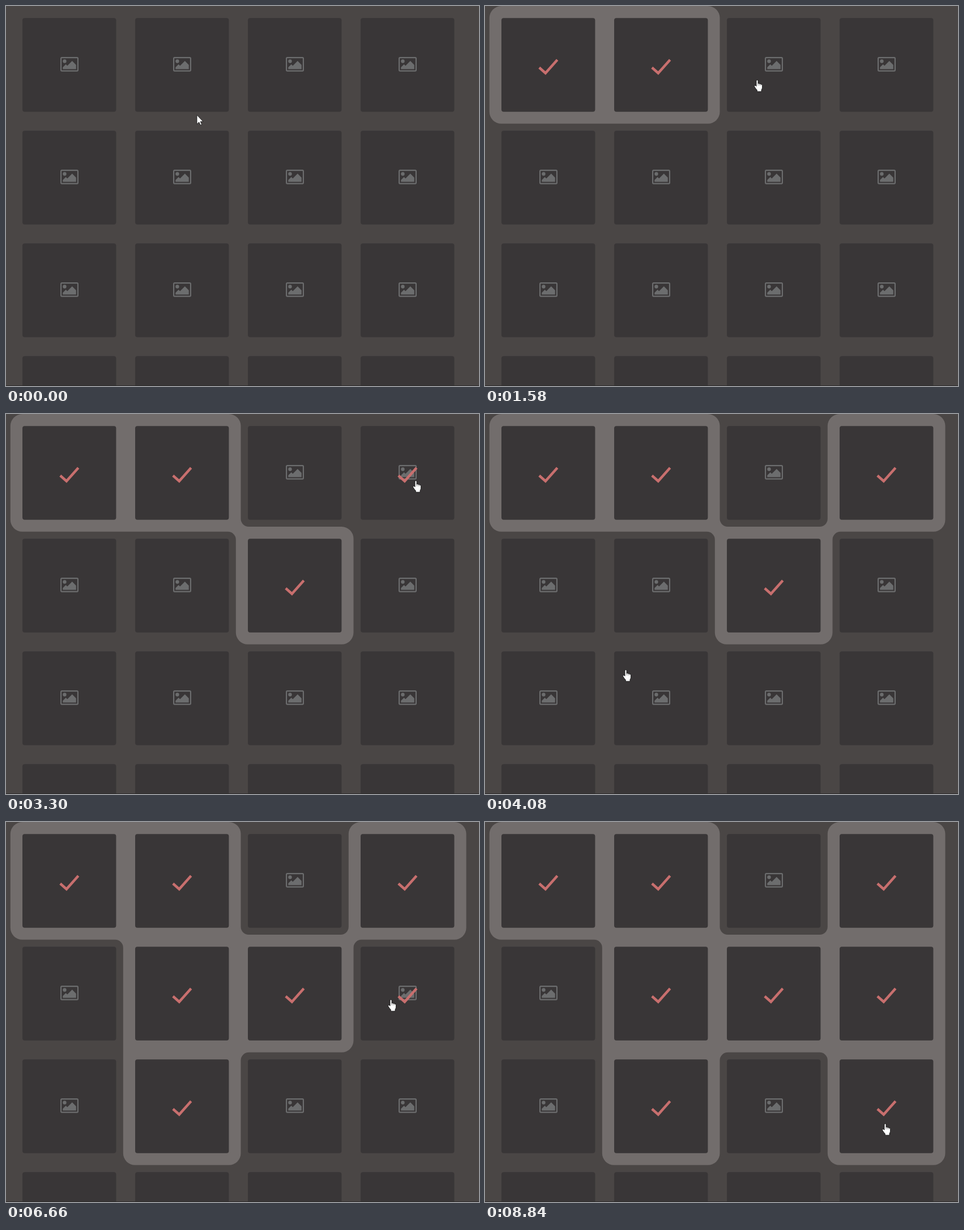
These frames come from a looping animation (835 px wide and 671 px high, 9.25 s). An HTML page:

```html
<!DOCTYPE html>
<html lang="en">
<head>
<meta charset="utf-8">
<title>Tile selection</title>
<style>
  html, body { margin: 0; width: 100%; height: 100%; overflow: hidden; background: #4a4645; }
  svg { display: block; width: 100vw; height: 100vh; }
</style>
</head>
<body>
<svg viewBox="0 0 835 671">
  <defs>
    <g id="picture">
      <rect x="1.07" y="1.07" width="29.86" height="23.46" rx="1.6" fill="none" stroke="#6c6d6e" stroke-width="2.13"/>
      <path d="M27.73 13.87V21.33H4.27V18.13L9.6 12.8 12.27 15.47 20.8 6.93Z" fill="#6c6d6e"/>
      <circle cx="7.47" cy="7.47" r="3.2" fill="#6c6d6e"/>
    </g>
    <path id="check" d="M66.8 87.4L77.8 97.2L98.7 73.6" fill="none" stroke="#c86f6e" stroke-width="4.5"/>
  </defs>
  <rect width="835" height="671" fill="#4a4645"/>
  <path id="rings" fill="#726d6c"/>
  <g id="tiles"></g>
  <rect y="670" width="835" height="1" fill="#2d2b2b"/>
  <g id="cursor" stroke="#111" stroke-width=".8" stroke-linejoin="round" fill="#fff">
    <path id="arrow" d="M0 .5V16.5L3.7 13 6.2 18.3 8.6 17.3 6.2 12H11Z"/>
    <g id="hand" transform="translate(-5 -1)">
      <path d="M4 2.2a1.5 1.5 0 0 1 3 0V7q1.6-.9 2.8.5q1.5-.6 2.4.7q2-.2 2.3 1.6V14q0 2-1.5 4v3H5.3V18.6Q2.6 15.6 .8 12.5q-.8-1.8 1-2.3q1.2 0 2.2 1.6Z"/>
      <path fill="none" stroke-width=".5" d="M7 7V10.5M9.8 7.5V10.5M12.2 8.2V10.5"/>
    </g>
  </g>
</svg>
<script>
const LOOP = 9250, STEP = 77, RING_DELAY = 75;
const COLS = 4, PITCH = 199, LEFT = 29, TOP = 21.3, SIZE = 165.4;
const RING = { x: 7.8, y: 0.1, size: 207.7, outer: 21, inner: 14 };

// Each move may first pick a tile, then carries the pointer along its points.
const moves = [
  { from: 70, to: 340, path: [[94, 106]] },
  { from: 570, to: 960, pick: [0, 0], path: [[339, 115]] },
  { from: 1190, to: 1970, pick: [0, 1], path: [[480, 131], [513, 297]] },
  { from: 2200, to: 3070, pick: [1, 2], path: [[340, 420], [723, 118]] },
  { from: 3300, to: 4080, pick: [0, 3], path: [[248, 452]] },
  { from: 4390, to: 5250, pick: [2, 1], path: [[427, 440], [123, 400], [246, 318], [286, 309]] },
  { from: 5490, to: 6340, pick: [1, 1], path: [[470, 191], [679, 314]] },
  { from: 6660, to: 7210, pick: [1, 3], path: [[629, 502]] },
  { from: 7360, to: 7910, path: [[652, 552], [706, 534]] },
  { from: 8060, to: 8380, pick: [2, 3], path: [[706, 533]] }
];
let rest = [337, 192];
for (const move of moves) {
  move.path.unshift(rest);
  rest = move.path[move.path.length - 1];
}

const byId = id => document.getElementById(id);
const show = (node, visible) => node.setAttribute("visibility", visible ? "visible" : "hidden");

const tiles = Array.from({ length: 4 * COLS }, (_, i) => {
  const row = Math.floor(i / COLS), col = i % COLS;
  const tile = document.createElementNS("http://www.w3.org/2000/svg", "g");
  tile.setAttribute("transform", `translate(${LEFT + col * PITCH} ${TOP + row * PITCH})`);
  tile.innerHTML = `<rect width="${SIZE}" height="${SIZE}" rx="4" fill="#393637"/>
    <use href="#picture" x="67" y="68.8"/><use href="#check"/>`;
  byId("tiles").append(tile);
  const move = moves.find(({ pick }) => pick && pick[0] === row && pick[1] === col);
  return { picture: tile.children[1], check: tile.children[2], time: move ? move.from : Infinity };
});

// Catmull-Rom curve through the points, u from 0 to 1
function along(points, u) {
  const last = points.length - 1;
  const i = Math.min(last - 1, Math.floor(u * last)), f = u * last - i;
  const at = k => points[Math.max(0, Math.min(last, k))];
  return [0, 1].map(axis => {
    const [a, b, c, d] = [-1, 0, 1, 2].map(k => at(i + k)[axis]);
    return b + f / 2 * (c - a + f * (2 * a - 5 * b + 4 * c - d + f * (3 * (b - c) + d - a)));
  });
}

// The pointer advances in screen refreshes, about one STEP apart.
function pointerAt(t) {
  const move = moves.filter(m => m.from <= t).pop();
  if (!move) return moves[0].path[0];
  const count = Math.round((move.to - move.from) / STEP);
  const done = Math.floor((t - move.from) / (move.to - move.from) * count + 0.1);
  const u = move.pick ? done / count : (done + 1) / (count + 1);
  return along(move.path, Math.min(1, u));
}

function overTile(x, y) {
  return x >= LEFT && y >= TOP && (x - LEFT) % PITCH < SIZE && (y - TOP) % PITCH < SIZE;
}

// Corners are round when free, square when they touch a neighbour;
// inner corners of the merged outline get a fillet.
function ringPath(on) {
  const { size, outer, inner } = RING;
  let d = "";
  tiles.forEach((_, i) => {
    const r = Math.floor(i / COLS), c = i % COLS;
    const x = RING.x + c * PITCH, y = RING.y + r * PITCH;
    if (on(r, c)) {
      const radius = (dr, dc) =>
        on(r + dr, c) || on(r, c + dc) || on(r + dr, c + dc) ? 0 : outer;
      const tl = radius(-1, -1), tr = radius(-1, 1), br = radius(1, 1), bl = radius(1, -1);
      d += `M${x + tl} ${y}H${x + size - tr}a${tr} ${tr} 0 0 1 ${tr} ${tr}V${y + size - br}` +
        `a${br} ${br} 0 0 1 ${-br} ${br}H${x + bl}a${bl} ${bl} 0 0 1 ${-bl} ${-bl}V${y + tl}` +
        `a${tl} ${tl} 0 0 1 ${tl} ${-tl}Z`;
      return;
    }
    for (const dr of [-1, 1]) for (const dc of [-1, 1]) {
      if (!on(r + dr, c) || !on(r, c + dc)) continue;
      const cx = x + (dc < 0 ? size - PITCH : PITCH);
      const cy = y + (dr < 0 ? size - PITCH : PITCH);
      const sx = -dc * inner, sy = -dr * inner;
      // wound like the rings so that overlaps stay filled
      d += `M${cx} ${cy}` + (dr * dc > 0
        ? `h${sx}a${inner} ${inner} 0 0 0 ${-sx} ${sy}Z`
        : `v${sy}a${inner} ${inner} 0 0 0 ${sx} ${-sy}Z`);
    }
  });
  return d;
}

function draw(t) {
  for (const tile of tiles) {
    show(tile.picture, t < tile.time + RING_DELAY);
    show(tile.check, t >= tile.time);
  }
  const ringed = (r, c) =>
    c >= 0 && c < COLS && t >= (tiles[r * COLS + c]?.time ?? Infinity) + RING_DELAY;
  byId("rings").setAttribute("d", ringPath(ringed));

  const [x, y] = pointerAt(t).map(Math.round);
  const hand = overTile(x, y);
  byId("cursor").setAttribute("transform", `translate(${x} ${y})`);
  show(byId("hand"), hand);
  show(byId("arrow"), !hand);
}

const start = performance.now();
function tick() {
  draw((performance.now() - start) % LOOP);
  requestAnimationFrame(tick);
}
tick();
</script>
</body>
</html>
```
